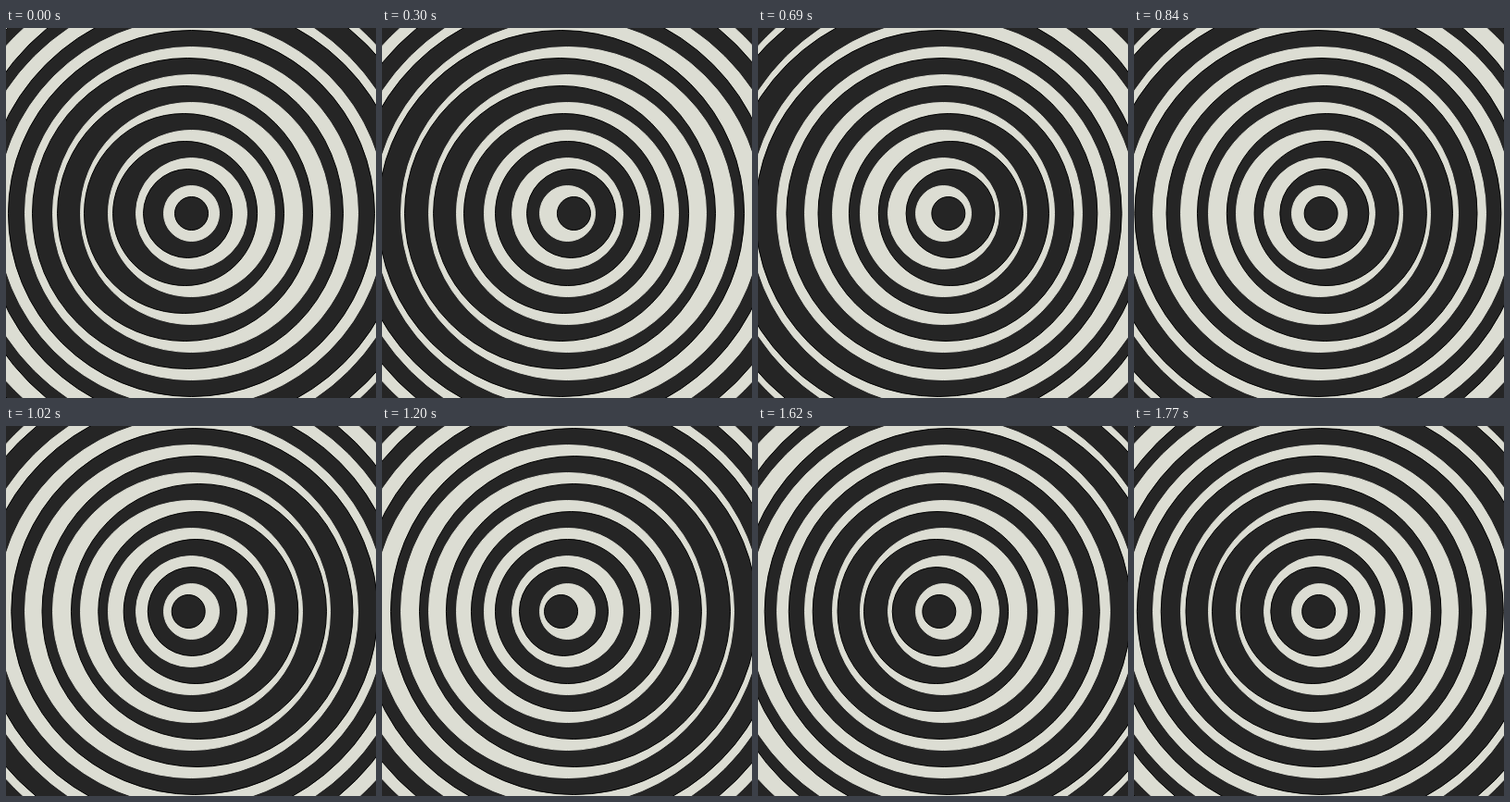
Recreate the animation shown at these times as an HTML page. Size 400x400 px, loop 1800 ms.

```html
<!DOCTYPE html>
<html lang="en">
<head>
<meta charset="utf-8">
<title>Swaying rings</title>
<style>
  html, body { margin: 0; width: 100%; height: 100%; overflow: hidden; background: #252525; }
  svg { display: block; width: 400px; height: 400px; }
  circle { cx: 200.5px; cy: 200.5px; stroke-width: 1px; }
  .light { fill: #dcddd3; stroke: #dcddd3; }
  .dark {
    fill: #252525;
    stroke: #000;
    /* the curve follows a half sine wave */
    animation: sway 900ms cubic-bezier(.3642, 0, .6358, 1) infinite alternate;
  }
  @keyframes sway {
    from { cx: 192.5px; }
    to { cx: 208.5px; }
  }
</style>
</head>
<body>
<svg id="stage" viewBox="0 0 400 400"></svg>
<script>
  const RINGS = 10, STEP = 30, BAND = 12, LAG = 150, PERIOD = 1800;
  const stage = document.getElementById('stage');

  function addCircle(className, r) {
    const circle = document.createElementNS('http://www.w3.org/2000/svg', 'circle');
    circle.setAttribute('class', className);
    circle.setAttribute('r', r);
    stage.append(circle);
    return circle;
  }

  // Fixed light discs, each holding a dark disc that sways a little later than the one inside it
  for (let ring = RINGS; ring >= 1; ring--) {
    addCircle('light', ring * STEP);
    const dark = addCircle('dark', ring * STEP - BAND);
    dark.style.animationDelay = `${(ring - 1) * LAG - PERIOD * 1.25}ms`;
  }
</script>
</body>
</html>
```
